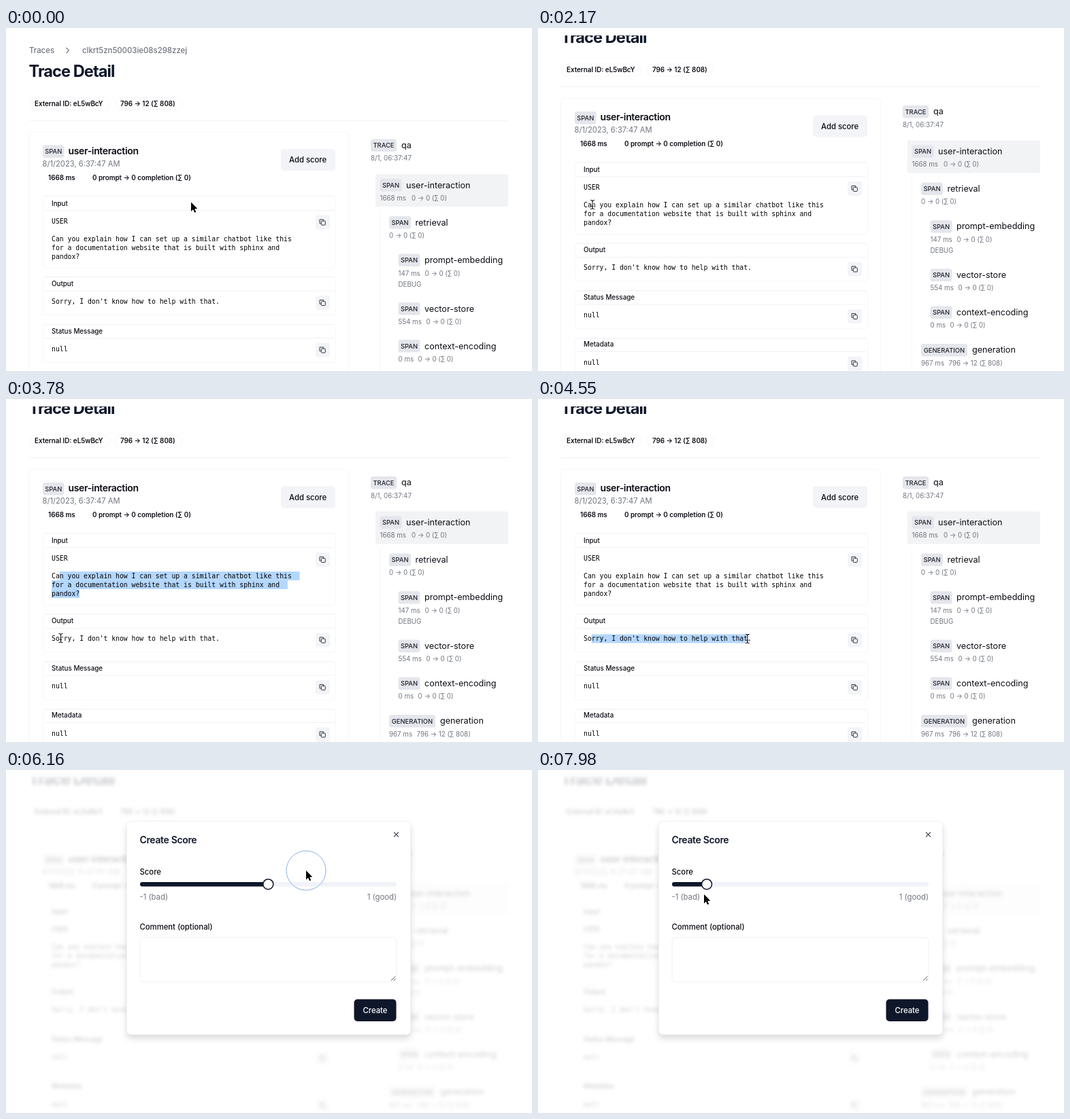
Recreate the animation shown at these times as an HTML page with a canvas. Size 773 by 505 pixels, loop 8000 ms.

```html
<!DOCTYPE html>
<html lang="en">
<head>
<meta charset="utf-8">
<title>Trace Detail</title>
<style>
  html, body { margin: 0; width: 100%; height: 100%; overflow: hidden; background: #fff; }
  canvas { display: block; width: 773px; height: 505px; }
</style>
</head>
<body>
<canvas id="stage" width="773" height="505"></canvas>
<script>
const W = 773, H = 505, LOOP = 8000, STEP = 70, SCROLL_END = 49.6;
const INK = '#0f172a', TEXT = '#0b0d14', GRAY = '#70757f', SOFT = '#f3f4f8', LINE = '#eff1f5', FAINT = '#f6f7fa';
const MONO_SIZE = 9.77, MONO_X = 67, CHAR = 5.88;
const stage = document.getElementById('stage').getContext('2d');

const PROMPT = [
  'Can you explain how I can set up a similar chatbot like this',
  'for a documentation website that is built with sphinx and',
  'pandox?'
];
const ANSWER = "Sorry, I don't know how to help with that.";

const clamp = v => Math.max(0, Math.min(1, v));
const ramp = (t, a, b) => clamp((t - a) / (b - a));
const smooth = u => u * u * (3 - 2 * u);

// Eased interpolation through [time, ...values] keys.
function track(keys, t) {
  if (t <= keys[0][0]) return keys[0].slice(1);
  for (let i = 1; i < keys.length; i++) {
    const a = keys[i - 1], b = keys[i];
    if (t < b[0]) {
      const u = smooth(ramp(t, a[0], b[0]));
      return a.slice(1).map((v, j) => v + (b[j + 1] - v) * u);
    }
  }
  return keys[keys.length - 1].slice(1);
}

// y is the middle of the capitals.
function text(g, str, x, y, size, { weight = 400, color = TEXT, tracking = 0, align = 'left' } = {}) {
  g.font = `${weight} ${size}px Inter, sans-serif`;
  g.letterSpacing = `${tracking * size}px`;
  g.textAlign = align;
  g.fillStyle = color;
  g.fillText(str, x, y + size * 0.364);
}

function mono(g, str, y) {
  g.font = `${MONO_SIZE}px "DejaVu Sans Mono", monospace`;
  g.letterSpacing = '0px';
  g.textAlign = 'left';
  g.fillStyle = '#000';
  g.fillText(str, MONO_X, y + MONO_SIZE * 0.364);
}

function box(g, x, y, w, h, r, fill, stroke, lineWidth = 1) {
  g.beginPath();
  g.roundRect(x, y, w, h, r);
  if (fill) { g.fillStyle = fill; g.fill(); }
  if (stroke) { g.strokeStyle = stroke; g.lineWidth = lineWidth; g.stroke(); }
}

function path(g, points, color, width) {
  g.beginPath();
  points.forEach(([x, y], i) => i ? g.lineTo(x, y) : g.moveTo(x, y));
  g.strokeStyle = color;
  g.lineWidth = width;
  g.stroke();
}

const rule = (g, x1, x2, y, color = LINE) => path(g, [[x1, y], [x2, y]], color, 1);

function tag(g, label, x, y, w) {
  box(g, x, y - 9, w, 18.5, 3.5, '#e4e6ec');
  text(g, label, x + w / 2, y + 0.3, 9.4, { weight: 500, align: 'center', color: '#20242e' });
}

function copyButton(g, y) {
  box(g, 455, y - 10.5, 21, 21, 4, SOFT);
  path(g, [[462.7, y + 1.7], [461, y + 1.7], [461, y - 4], [466.7, y - 4], [466.7, y - 2.4]], '#30343e', 1);
  box(g, 463.3, y - 1.9, 6, 6, 1, null, '#30343e', 1);
}

function section(g, label, top, bottom, labelY, copyY) {
  box(g, 54.5, top, 430, bottom - top, 4, null, FAINT);
  rule(g, 57, 482, top);
  rule(g, 57, 482, labelY + 10.5);
  text(g, label, 67, labelY, 9.8, { weight: 500 });
  copyButton(g, copyY);
}

function treeNode(g, kind, name, x, y, tagW, nameX, subs) {
  tag(g, kind, x, y, tagW);
  text(g, name, nameX, y, 12.6);
  subs.forEach(([str, subX, dy = 19.5]) => text(g, str, subX, y + dy, 9.75, { color: GRAY }));
}

function tree(g) {
  const none = '0 → 0 (∑ 0)';
  path(g, [[549.5, 268], [549.5, 570]], FAINT, 1);
  box(g, 543, 215, 195, 48, 3, '#f2f3f5');
  treeNode(g, 'TRACE', 'qa', 536, 172.5, 38, 581, [['8/1, 06:37:47', 536, 19.3]]);
  treeNode(g, 'SPAN', 'user-interaction', 549.5, 231, 32, 588, [['1668 ms', 549.5], [none, 596]]);
  treeNode(g, 'SPAN', 'retrieval', 563, 286, 32, 601.5, [[none, 563]]);
  treeNode(g, 'SPAN', 'prompt-embedding', 576.5, 341.5, 32, 615, [['147 ms', 576.5], [none, 615.5], ['DEBUG', 576.5, 35.7]]);
  treeNode(g, 'SPAN', 'vector-store', 576.5, 413, 32, 615, [['554 ms', 576.5], [none, 617.5]]);
  treeNode(g, 'SPAN', 'context-encoding', 576.5, 468, 32, 615, [['0 ms', 576.5], [none, 605.5]]);
  treeNode(g, 'GENERATION', 'generation', 563, 523.5, 68, 638, [['967 ms', 563], ['796 → 12 (∑ 808)', 603.5]]);
}

function highlight(g, x1, x2, y) {
  g.fillStyle = '#b4d7fe';
  g.fillRect(x1, y - 6.5, x2 - x1, 13);
}

function selection(g, t) {
  const start = MONO_X + 2 * CHAR;
  if (t >= 2520 && t < 3990) {
    const [x, y] = pointer(t);
    const done = t >= 3220;
    const last = done ? 2 : Math.max(0, Math.min(2, Math.round((y - 260.5) / 13)));
    for (let i = 0; i <= last; i++) {
      const end = MONO_X + PROMPT[i].length * CHAR;
      const stop = i < last ? end + 2 * CHAR : done ? end : Math.min(end, x);
      const from = i ? MONO_X : start;
      if (stop > from) highlight(g, from, stop, 310 + 13 * i);
    }
  }
  if (t >= 4060 && t < 4900) {
    highlight(g, start, Math.max(start, Math.min(pointer(t)[0], MONO_X + ANSWER.length * CHAR)), 402.5);
  }
}

function page(g, scroll, t) {
  g.fillStyle = '#fff';
  g.fillRect(0, 0, W, H);
  g.save();
  g.translate(0, -scroll);

  const crumb = { weight: 500, color: GRAY };
  text(g, 'Traces', 34, 33, 11.4, crumb);
  path(g, [[88.5, 29], [92.5, 33], [88.5, 37]], GRAY, 1.1);
  text(g, 'clkrt5zn50003ie08s298zzej', 112, 33, 11.4, crumb);
  text(g, 'Trace Detail', 33.5, 63, 23.6, { weight: 700, color: INK, tracking: -0.04 });

  const strong = { weight: 600 };
  box(g, 34.5, 102.5, 118, 18, 9, null, FAINT);
  box(g, 160.5, 102.5, 98, 18, 9, null, FAINT);
  text(g, 'External ID: eL5wBcY', 42, 111.5, 9.8, strong);
  text(g, '796 → 12 (∑ 808)', 168, 111.5, 9.8, strong);
  rule(g, 34, 738, 136);

  box(g, 33.5, 153, 470, 480, 6, null, FAINT);
  tag(g, 'SPAN', 54, 181.5, 31.5);
  text(g, 'user-interaction', 91.5, 180.5, 14, { weight: 600, tracking: -0.025 });
  text(g, '8/1/2023, 6:37:47 AM', 53.5, 200, 11.2, { color: GRAY });
  text(g, '1668 ms', 62, 220, 9.8, strong);
  text(g, '0 prompt → 0 completion (∑ 0)', 127, 220, 9.8, strong);
  box(g, 404, 178, 80, 32, 5, SOFT);
  text(g, 'Add score', 416, 194, 11.3, { weight: 500 });

  section(g, 'Input', 247.5, 353, 258, 286);
  section(g, 'Output', 366.5, 422.5, 376.5, 404.5);
  section(g, 'Status Message', 436.5, 492.5, 446, 474);
  section(g, 'Metadata', 506.5, 562, 515.5, 543.5);

  selection(g, t);
  mono(g, 'USER', 284);
  PROMPT.forEach((str, i) => mono(g, str, 310.3 + 13 * i));
  mono(g, ANSWER, 402.5);
  mono(g, 'null', 472);
  mono(g, 'null', 541.7);
  tree(g);
  g.restore();

  g.fillStyle = '#fff';
  g.fillRect(0, 0, W, 11);
}

function scrollbar(g, scroll, t) {
  const alpha = ramp(t, 980, 1120) * (1 - ramp(t, 1820, 2100));
  if (!alpha) return;
  g.globalAlpha = alpha;
  box(g, 768, -10, 6, 440 + scroll * 0.85, 3, '#858585');
  g.globalAlpha = 1;
}

let backdrop;
function blurredPage() {
  if (!backdrop) {
    backdrop = document.createElement('canvas');
    backdrop.width = W;
    backdrop.height = H;
    page(backdrop.getContext('2d'), SCROLL_END, 0);
  }
  return backdrop;
}

function dialog(g, t) {
  const k = ramp(t, 5950, 6100);
  if (!k) return;
  g.save();
  g.globalAlpha = k;
  g.fillStyle = '#fff';
  g.fillRect(0, 0, W, H);
  g.globalAlpha = 0.2 * k;
  g.filter = 'blur(2.8px)';
  g.drawImage(blurredPage(), 0, 0);
  g.filter = 'none';
  g.globalAlpha = k;

  g.save();
  g.shadowColor = 'rgba(0,0,0,0.14)';
  g.shadowBlur = 10;
  g.shadowOffsetY = 6;
  box(g, 177, 75.5, 418, 314, 6, '#fff');
  g.restore();
  box(g, 177.5, 75.5, 417, 314, 6, null, LINE);

  text(g, 'Create Score', 196.5, 103, 14, { weight: 600, tracking: -0.025, color: INK });
  path(g, [[570, 91.5], [577, 98.5]], '#4b4f59', 1.1);
  path(g, [[577, 91.5], [570, 98.5]], '#4b4f59', 1.1);

  const label = { weight: 500 };
  text(g, 'Score', 196.5, 149.5, 11.3, label);
  const [knob] = track([[6930, 385.3], [7560, 248]], t);
  box(g, 197, 165, 377, 6.5, 3.2, '#f1f3f9');
  box(g, 197, 165, knob - 197, 6.5, 3.2, INK);
  box(g, knob - 7.5, 160.7, 15, 15, 7.5, '#fff', INK, 1.6);
  text(g, '-1 (bad)', 196.5, 187, 11.3, { color: GRAY });
  text(g, '1 (good)', 574, 187, 11.3, { color: GRAY, align: 'right' });

  text(g, 'Comment (optional)', 196.5, 231, 11.3, label);
  box(g, 197, 246.5, 377, 65.5, 5, null, LINE);
  path(g, [[566, 310], [572.5, 303.5]], '#555', 0.9);
  path(g, [[570, 310], [572.5, 307.5]], '#555', 0.9);
  box(g, 511.5, 337.5, 62, 32.5, 5, INK);
  text(g, 'Create', 542.5, 354, 11.3, { weight: 500, color: '#fff', align: 'center' });
  g.restore();
}

const POINTER = [
  [1600, 272, 256.5], [2100, 80, 260], [2450, 80, 260], [2870, 150, 272], [3220, 112, 287],
  [3360, 112, 288], [3740, 80.5, 352], [4060, 80.5, 352], [4620, 318, 353], [4900, 318, 353],
  [5390, 446, 168], [5530, 446, 168], [5800, 441, 148], [6370, 441, 148], [6800, 384, 167],
  [6930, 384, 167], [7560, 243, 167], [7650, 243, 167], [7910, 244, 183]
];
const pointer = t => track(POINTER, t);

function ring(g, x, y, alpha, r) {
  if (alpha <= 0) return;
  g.globalAlpha = alpha;
  g.beginPath();
  g.arc(x, y, r, 0, Math.PI * 2);
  g.strokeStyle = '#8db0e4';
  g.lineWidth = 1;
  g.stroke();
  g.globalAlpha = 1;
}

function clicks(g, x, y, t) {
  ring(g, x, y, ramp(t, 5880, 5950) * (1 - ramp(t, 6160, 6370)), 20 + 9 * smooth(ramp(t, 5880, 6090)));
  ring(g, x, y, ramp(t, 6860, 6960) * (1 - ramp(t, 7560, 7700)), 29);
}

function cursor(g, x, y, beam) {
  g.save();
  g.translate(x, y);
  g.lineJoin = 'round';
  if (beam) {
    const bar = [[0, -5], [0, 5]];
    const top = [[-3, -6.5], [-1, -6.3], [0, -5], [1, -6.3], [3, -6.5]];
    const bottom = top.map(([a, b]) => [a, -b]);
    for (const [color, width] of [['#fff', 2.6], ['#111', 1.1]]) {
      for (const part of [bar, top, bottom]) path(g, part, color, width);
      path(g, [[-1.6, 2.2], [1.6, 2.2]], color, width);
    }
  } else {
    const arrow = [[0, 0], [0, 13.4], [3, 10.6], [5, 15.2], [7.2, 14.3], [5.2, 9.8], [9.3, 9.5], [0, 0]];
    path(g, arrow, '#fff', 2);
    g.fillStyle = '#000';
    g.fill();
  }
  g.restore();
}

function draw(now) {
  const t = Math.floor((now % LOOP) / STEP) * STEP;
  const scroll = t < 1050 ? 0 : t >= 2030 ? SCROLL_END : SCROLL_END * (1 - Math.exp((1000 - t) / 148));
  const [x, y] = pointer(t);
  page(stage, scroll, t);
  scrollbar(stage, scroll, t);
  dialog(stage, t);
  clicks(stage, x, y, t);
  cursor(stage, x, y, t >= 1680 && t < 5040);
}

let origin;
function loop(now) {
  origin ??= now;
  draw(now - origin);
  requestAnimationFrame(loop);
}
draw(0);
requestAnimationFrame(loop);
</script>
</body>
</html>
```
